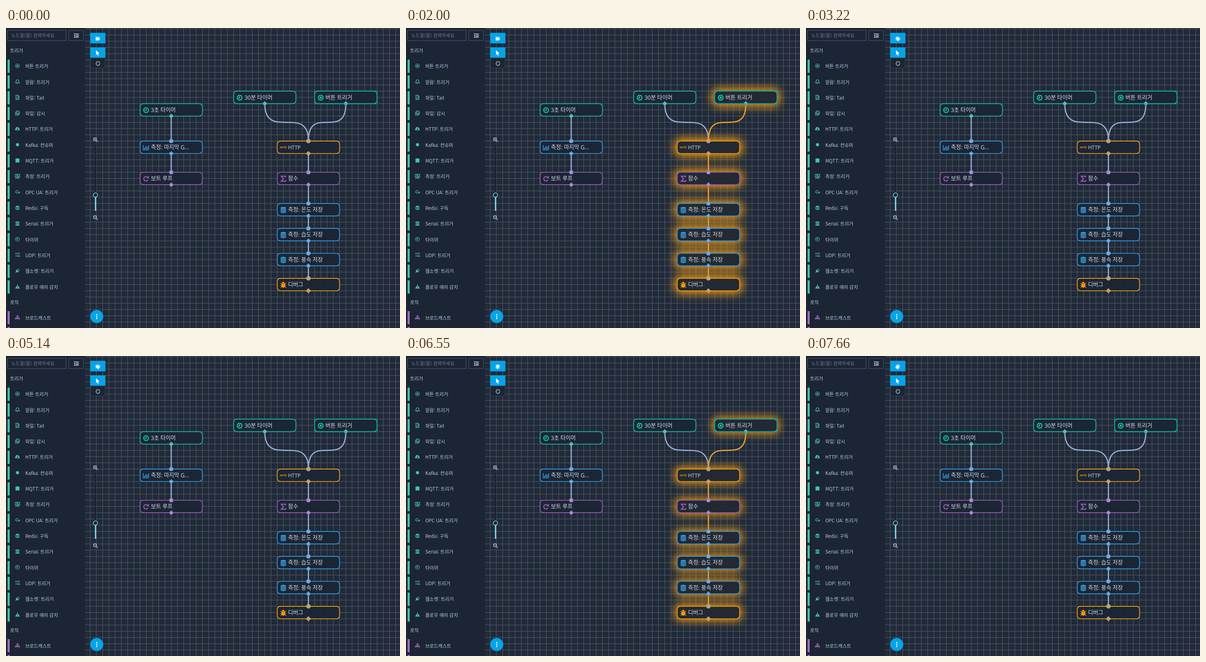
Write an HTML page that moves like this. It is 858x653 px and loops after 7680 ms.

```html
<!DOCTYPE html>
<html lang="ko">
<head>
<meta charset="utf-8">
<style>
  html, body { margin: 0; width: 100%; height: 100%; overflow: hidden; background: #202a39; }
  svg { display: block; }
  text { font: 10.2px 'Noto Sans CJK KR', 'Noto Sans CJK', sans-serif; fill: #b7cbe8; }
  text.label { font: 12px 'Open Sans', 'Noto Sans CJK KR', 'Noto Sans CJK', sans-serif; fill: #d8dee7; }
  text.mini { font: 700 5.4px 'Open Sans', sans-serif; fill: currentColor; stroke: none; text-anchor: middle; }
  .icon { fill: none; stroke: currentColor; }
  .icon .f { fill: currentColor; stroke: none; }
</style>
</head>
<body>
<svg id="stage" width="858" height="653" viewBox="0 0 858 653"></svg>
<script>
const GRID = 13.58, X0 = 291.9, Y0 = 164.6, LOOP = 7680;
const GREEN = '#1abc9c', BLUE = '#3498db', PURPLE = '#9b59b6', ORANGE = '#f39c12';
const WIRE = [148, 169, 209], HOT = [243, 156, 18];
const ACCENT = '#04a4e8';

// Icons live in a box of about 12 units centred on the origin.
const icons = {
  target: '<circle r="4.8"/><circle class="f" r="2.3"/>',
  clock: '<circle r="4.8"/><path d="M0-3V.5H-2.6"/>',
  bell: '<path d="M-5 3.2Q-3.3 1.5-3.3-1A3.3 3.6 0 0 1 3.3-1Q3.3 1.5 5 3.2ZM-1.4 4.8H1.4M0-6V-4.5"/>',
  file: '<path d="M-4-5.4H1.4L4-2.7V5.4H-4ZM1.2-5V-2.5H4M-2 0H2M-2 2.6H2"/>',
  files: '<path d="M-2-5.4H2.4L5-3V3H-2ZM-2-3H-5V5.4H2V3M0-1H3M0 1H3"/>',
  cloud: '<path class="f" d="M-4 4A3 3 0 0 1-4.5-1.4A3.7 3.7 0 0 1 2.4-3A2.4 2.4 0 0 1 4.5-.3A2.3 2.3 0 0 1 4 4Z"/><path stroke="#1c2534" d="M0 3V-1M-1.8 1L0 3L1.8 1"/>',
  disc: '<circle class="f" r="4"/>',
  square: '<path class="f" d="M-5-5H5V5H-5Z"/>',
  monitor: '<path d="M-5.5-5H5.5V2H-5.5ZM-5.5 5H5.5M0 2V5M-4-1H-2L-1-3L1 0L2-1H4"/>',
  link: '<path d="M-3 2.4A2.4 2.4 0 0 1-3.3-2.2A3 3 0 0 1 2-1.4M-3 2.4H2.4"/><circle cx="4.2" cy="1.2" r="1.5"/>',
  layers: '<path class="f" d="M0-5.5L6-2.7L0 0L-6-2.7Z"/><path d="M-5.7 0L0 2.6L5.7 0M-5.7 2.7L0 5.2L5.7 2.7"/>',
  phone: '<path stroke-width="2.2" d="M-5-1.5Q-4-4.2 0-4.2T5-1.5"/><path d="M-2.6-1H2.6L4.5 4.6H-4.5ZM-2 1.2H2M-2.6 3H2.6"/>',
  udp: '<text class="mini" y="-1">UDP</text><path d="M-5.5 2.5H5M3 .5L5.3 2.5L3 4.5"/>',
  plug: '<path class="f" d="M-2.5-3L3 2.5Q0 5.2-3 3.2L-5.5 5.6L-6 5L-3.6 2.5Q-5.5-.5-2.5-3Z"/><path stroke-width="1.7" d="M-1-1.8L2.4-5.2M2 1.3L5.4-2"/>',
  alert: '<path class="f" d="M0-5.5L6 5H-6Z"/><path stroke="#1c2534" d="M0-2V1.6M0 2.7V4"/>',
  tree: '<path d="M0-2V3M-4 3V0H4V3"/><path class="f" d="M-1.8-5H1.8V-1.5H-1.8ZM-6 2H-2.6V5H-6ZM-1.7 2H1.7V5H-1.7ZM2.6 2H6V5H2.6Z"/>',
  chart: '<path stroke-width="1.3" d="M-5.7-5V4.5H6"/><path class="f" d="M-3.8 0H-2V3H-3.8ZM-1.2-3H.6V3H-1.2ZM1.4-1H3.2V3H1.4ZM4-4H5.7V3H4Z"/>',
  loop: '<path d="M3.6-2.8A4.5 4.5 0 1 0 3.6 2.8"/><path class="f" d="M5.6-5.8V-.6H.4Z"/>',
  sigma: '<path d="M4.5-2.6V-5H-4L.5 0L-4 5H4.5V2.6"/>',
  http: '<text class="mini" y="2">HTTP</text>',
  db: '<path class="f" d="M-5.4-4A5.4 2 0 0 1 5.4-4V4.3A5.4 2 0 0 1-5.4 4.3Z"/><path stroke="#1c2636" stroke-width=".8" d="M-5.4-3.2Q0-.2 5.4-3.2M-5.4-.3Q0 2.7 5.4-.3M-5.4 2.6Q0 5.6 5.4 2.6"/>',
  bug: '<path class="f" d="M-2.8-3.2A2.8 2.8 0 0 1 2.8-3.2ZM-3.4-2.5H3.4V2A3.4 3.6 0 0 1-3.4 2Z"/><path stroke-width="1.2" d="M-3-1.5L-5.2-3.8M3-1.5L5.2-3.8M-6 .8H6M-3 3L-5.2 5.2M3 3L5.2 5.2"/>'
};

const icon = (name, x, y, color, scale, weight) =>
  `<g class="icon" color="${color}" stroke-width="${weight}" transform="translate(${x} ${y}) scale(${scale})">${icons[name]}</g>`;
const text = (s, x, y, attrs = '') => `<text x="${x}" y="${y}" ${attrs}>${s}</text>`;
const rect = (x, y, w, h, attrs) => `<rect x="${x}" y="${y}" width="${w}" height="${h}" ${attrs}/>`;
const line = (d, color, width) => `<path d="${d}" fill="none" stroke="${color}" stroke-width="${width}"/>`;

function grid() {
  let d = '';
  for (let x = X0 - 8 * GRID; x < 858; x += GRID) d += `M${x} 0V653`;
  for (let y = Y0 - 12 * GRID; y < 653; y += GRID) d += `M172 ${y}H858`;
  return line(d, '#535d69', 1);
}

// Column, row (grid cells), colour, icon, label, has input, lights up
const nodes = [
  [0, 0, GREEN, 'clock', '3초 타이머', 0, 0],
  [0, 6, BLUE, 'chart', '측정: 마지막 G...', 1, 0],
  [0, 11, PURPLE, 'loop', '보트 루프', 1, 0],
  [15, -2, GREEN, 'clock', '30분 타이머', 0, 0],
  [28, -2, GREEN, 'target', '버튼 트리거', 0, 1],
  [22, 6, ORANGE, 'http', 'HTTP', 1, 1],
  [22, 11, PURPLE, 'sigma', '함수', 1, 1],
  [22, 16, BLUE, 'db', '측정: 온도 저장', 1, 1],
  [22, 20, BLUE, 'db', '측정: 습도 저장', 1, 1],
  [22, 24, BLUE, 'db', '측정: 풍속 저장', 1, 1],
  [22, 28, ORANGE, 'bug', '디버그', 1, 1]
].map(([c, r, color, pic, label, input, lit]) =>
  ({ x: X0 + c * GRID, y: Y0 + r * GRID, color, pic, label, input, lit }));

const W = 10 * GRID, H = 2 * GRID;
const box = (n, attrs) => rect(n.x, n.y, W, H, `rx="7" ${attrs}`);

function drawNode(n) {
  const cx = n.x + W / 2, port = `fill="#91a5cb" stroke="${n.color}" stroke-width="1.4"`;
  const latin = n.label === 'HTTP' ? ' style="font-size:11px"' : '';
  return box(n, `fill="#1c2636" fill-opacity=".96" stroke="${n.color}" stroke-width="1.7"`) +
    icon(n.pic, n.x + 13.2, n.y + H / 2 + .6, n.color, 1.1, 2) +
    text(n.label, n.x + 23.6, n.y + H / 2 + 4.7, 'class="label"' + latin) +
    (n.input ? `<circle cx="${cx}" cy="${n.y}" r="4.2" ${port}/>` : '') +
    `<path d="M${cx} ${n.y + H - 4.6}l4.6 4.6l-4.6 4.6l-4.6-4.6Z" ${port}/>`;
}

function wire(a, b) {
  const x1 = nodes[a].x + W / 2, y1 = nodes[a].y + H, x2 = nodes[b].x + W / 2, y2 = nodes[b].y;
  return line(`M${x1} ${y1}C${x1} ${y2} ${x2} ${y1} ${x2} ${y2}`, nodes[a].lit ? 'inherit' : `rgb(${WIRE})`, 2.7);
}

function sidebar() {
  const rows = [['target', '버튼 트리거'], ['bell', '알람: 트리거'], ['file', '파일: Tail'],
    ['files', '파일: 감시'], ['cloud', 'HTTP: 트리거'], ['disc', 'Kafka: 컨슈머'],
    ['square', 'MQTT: 트리거'], ['monitor', '측정: 트리거'], ['link', 'OPC UA: 트리거'],
    ['layers', 'Redis: 구독'], ['phone', 'Serial: 트리거'], ['clock', '타이머'],
    ['udp', 'UDP: 트리거'], ['plug', '웹소켓: 트리거'], ['alert', '플로우 에러 감지']];
  const row = (pic, label, y, color) => rect(3.5, y - 14.4, 4.5, 28.8, `fill="${color}"`) +
    icon(pic, 25, y - .8, color, .86, 1.4) + text(label, 42, y + 4);
  return rect(0, 0, 172, 653, 'fill="#1c2534"') + rect(0, 139, 1, 28, 'fill="#27618d"') +
    rect(3.5, 5, 127, 22.3, 'fill="none" stroke="#4d596d"') +
    rect(136.8, 5, 32, 22.3, 'fill="none" stroke="#4d596d"') +
    text('노드을(를) 검색하세요', 11.5, 20.2, 'style="fill:#717d90"') +
    line('M147.5 12.7H158.5M152 15.2H158.5M152 17.6H158.5M147.5 20H158.5', '#c9d6e8', 1.3) +
    '<path d="M150.5 14.2V18.6L147.5 16.4Z" fill="#c9d6e8"/>' +
    text('트리거', 9, 53) + text('로직', 9, 600.6) +
    rows.map(([p, s], i) => row(p, s, 83.2 + i * 34.32, '#45c5a5')).join('') +
    row('tree', '브로드캐스트', 630.6, '#a56cc0') + rect(3.5, 650.4, 4.5, 3, 'fill="#a56cc0"');
}

const lens = (y, sign) => `<g fill="none" stroke="#b9cbe6" stroke-width="1.3">
  <circle cx="194" cy="${y - .8}" r="3.4"/><path d="M196.6 ${y + 1.8}l3 3"/>
  <path stroke-width="1" d="M192.2 ${y - .8}h3.6${sign}"/></g>`;

const tools = rect(183.5, 10.5, 33, 23, `fill="${ACCENT}"`) + rect(183.5, 42, 33, 23, `fill="${ACCENT}"`) +
  rect(184, 65, 32, 22, 'fill="#1c2534" stroke="#3b4657"') +
  '<path d="M196 48.3V59L198.5 56.7L200.2 60.4L202 59.6L200.3 56H203.6Z" fill="#fff"/>' +
  line('M197.2 73.6Q200 72.6 203 73.6Q204.6 75 204 78Q203.2 81.2 200.8 81.4H198.6Q196 79.6 195.8 77.6Q196 76.4 197.2 76.6Z', '#c5d2e4', 1.1) +
  '<g id="spin" class="icon" color="#fff"></g>' +
  lens(243, 'm-1.8-1.8v3.6') + lens(412.5, '') +
  line('M195 254V363', '#18202d', 2.6) + line('M195 363V398', '#8be3fc', 2.6) +
  '<circle cx="194.8" cy="363.5" r="4.7" fill="#202a39" stroke="#8be3fc" stroke-width="1.3"/>' +
  `<circle cx="197.6" cy="628" r="14.2" fill="${ACCENT}"/>` +
  [623.9, 628, 632.1].map(y => rect(196.2, y - 1.3, 2.7, 2.6, 'rx=".7" fill="#fff"')).join('');

const wires = [[0, 1], [1, 2], [3, 5], [4, 5], [5, 6], [6, 7], [7, 8], [8, 9], [9, 10]];
const picked = nodes[4];

// The stroke on the glow boxes gives the blurred shadow its spread.
document.getElementById('stage').innerHTML =
  `<filter id="blur" filterUnits="userSpaceOnUse" x="530" y="80" width="328" height="560" color-interpolation-filters="sRGB">
    <feGaussianBlur id="amount" stdDeviation="0"/></filter>` +
  grid() +
  `<g id="glow" filter="url(#blur)" fill="${ORANGE}" stroke="${ORANGE}">${nodes.filter(n => n.lit).map(n => box(n, '')).join('')}</g>` +
  `<g id="wires">${wires.map(([a, b]) => wire(a, b)).join('')}</g>` +
  nodes.map(drawNode).join('') +
  rect(picked.x - .7, picked.y - .7, W + 1.4, H + 1.4, 'fill="none" stroke="#17919a"') +
  tools + sidebar();

const [glow, amount, wireGroup, spin] = ['glow', 'amount', 'wires', 'spin'].map(id => document.getElementById(id));
spin.innerHTML = icons.bug;

// One-second flash: eases up, then down again.
function flash(t, start) {
  const p = 1 - Math.abs((t - start) / 500 - 1);
  return p > 0 ? p * p * (3 - 2 * p) : 0;
}

function draw(now) {
  const t = now % LOOP;
  const heat = Math.max(flash(t, 1540), flash(t, 6160));
  glow.setAttribute('opacity', heat);
  glow.setAttribute('stroke-width', 12 * heat);
  amount.setAttribute('stdDeviation', .1 + 10 * heat);
  wireGroup.setAttribute('stroke', `rgb(${WIRE.map((c, i) => Math.round(c + (HOT[i] - c) * heat))})`);
  spin.setAttribute('transform', `translate(199.7 23.4) rotate(${90 + t * .18}) scale(.85)`);
  requestAnimationFrame(draw);
}
draw(performance.now());
</script>
</body>
</html>
```
